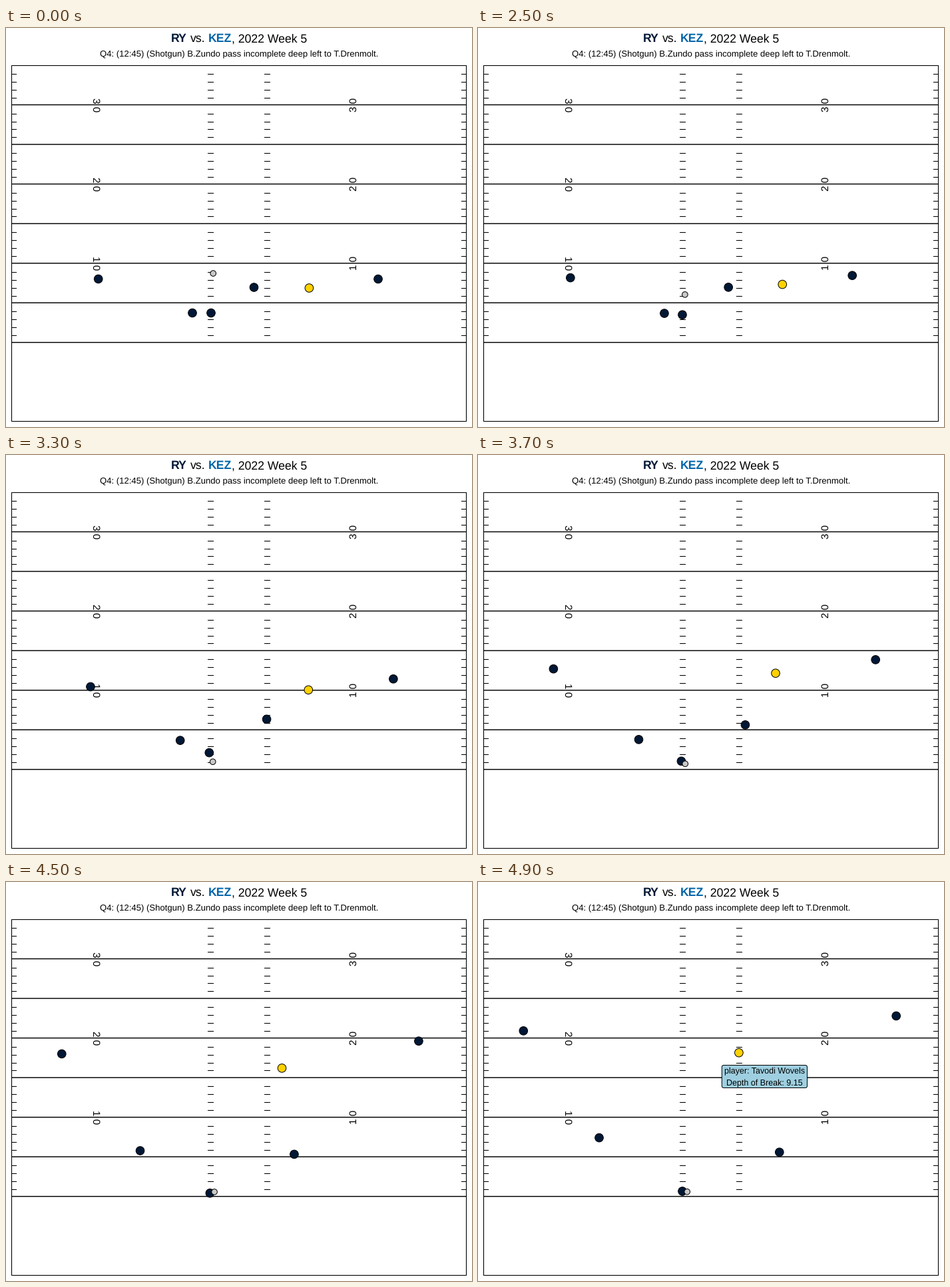
Write a matplotlib script that moves like this. It is 700 px wide and 600 px high and loops after 7 s.

```python
import math

import numpy as np
import matplotlib.pyplot as plt
from matplotlib.animation import FuncAnimation
from matplotlib.patches import Circle, FancyBboxPatch, Rectangle

W, H, DPI = 700, 600, 100
PT = 72 / DPI  # points per pixel

NAVY, BLUE, GOLD = "#001836", "#0065a9", "#ffd100"
GRAY, SKY = "#c8c8c8", "#9ecfe0"

LEFT, RIGHT, TOP, BOTTOM = 8.5, 691.5, 56.5, 591.5
GOAL, YARD = 472.8, 11.91

HOLD, LAST, FRAMES, STEP = 20, 29, 70, 100

plt.rcParams["font.family"] = "Liberation Sans"
plt.rcParams["text.hinting"] = "no_hinting"

fig = plt.figure(figsize=(W / DPI, H / DPI), dpi=DPI, facecolor="white")
ax = fig.add_axes([0, 0, 1, 1])
ax.set_xlim(0, W)
ax.set_ylim(H, 0)
ax.axis("off")


def text(x, y, s, px, **kw):
    kw = {"ha": "left", "va": "baseline", "color": "black", **kw}
    return ax.text(x, y, s, fontsize=px * PT, **kw)


def hline(x0, x1, y, px):
    ax.plot([x0, x1], [y, y], color="black", lw=px * PT,
            solid_capstyle="butt", snap=False, zorder=1)


def yard_y(yard):
    return GOAL - YARD * yard


def draw_titles():
    text(247.4, 21.3, "RY", 17.6, color=NAVY, weight="bold")
    text(276.6, 21.3, "vs.", 17.6)
    text(304.0, 21.3, "KEZ", 17.6, color=BLUE, weight="bold")
    text(339.2, 21.3, ", 2022 Week 5", 17.6)
    text(349.8, 43.4, "Q4: (12:45) (Shotgun) B.Zundo pass incomplete "
         "deep left to T.Drenmolt.", 13.15, ha="center")


def draw_field():
    ax.add_patch(Rectangle((LEFT, TOP), RIGHT - LEFT, BOTTOM - TOP, fill=False,
                           ec="black", lw=1.1 * PT, snap=False, zorder=1))
    for yard in range(35):
        y = yard_y(yard)
        if yard % 5 == 0:
            hline(LEFT, RIGHT, y, 1.45)
            continue
        y = math.floor(y + 1.75) + 0.5  # ticks sit on whole pixel rows
        for x0, x1 in ((LEFT, 16), (303, 312), (388, 397), (684, RIGHT)):
            hline(x0, x1, y, 1.1)
    for yard in (10, 20, 30):
        for x, angle in ((130.3, 270), (526.8, 90)):
            text(x, yard_y(yard), f"{yard // 10} 0", 15.2, ha="center",
                 rotation=angle, rotation_mode="anchor", zorder=2)


def glide(points):
    """Smooth run from rest through the points, sampled at every step."""
    k, p = np.array(BEATS, float), np.array(points, float)
    slope = np.gradient(p, k, axis=0)
    slope[0] = 0
    t = np.clip(np.arange(LAST + 1), k[0], k[-1])
    i = np.clip(np.searchsorted(k, t, side="right") - 1, 0, len(k) - 2)
    h = (k[i + 1] - k[i])[:, None]
    u = (t - k[i])[:, None] / h
    s = u * u * (3 - 2 * u)
    return (p[i] + s * (p[i + 1] - p[i])
            + h * u * (1 - u) * ((1 - u) * slope[i] - u * slope[i + 1]))


def runner(color, radius, *points):
    path = glide(points)
    dot = Circle(path[0], radius, fc=color, ec="black", lw=PT, zorder=4)
    ax.add_patch(dot)
    return dot, path


def make_label():
    box = FancyBboxPatch((366.3, 275.5), 128.2, 34,
                         boxstyle="round,pad=0,rounding_size=2.8",
                         fc=SKY, ec="black", lw=PT, zorder=6)
    ax.add_patch(box)
    style = {"ha": "center", "zorder": 7}
    return [box,
            text(430.4, 288.3, "player: Tavodi Wovels", 12.5, **style),
            text(430.4, 306.1, "Depth of Break: 9.15", 12.5, **style)]


draw_titles()
draw_field()

# Steps of the snap, the catch, the break and the end
BEATS = (1, 9, 21, 29)
BIG, SMALL = 6.3, 4.3
runners = [
    runner(NAVY, BIG, (138.7, 377.4), (136.1, 367.2), (98.7, 291.4), (68.3, 223.8)),
    runner(NAVY, BIG, (280, 428.5), (275.5, 429.2), (220.8, 420.5), (182, 384.6)),
    runner(NAVY, BIG, (308, 428.5), (305.6, 437.3), (305.8, 468.3), (307, 465)),
    runner(NAVY, BIG, (372.5, 390), (383.6, 391.2), (414.8, 410.8), (452.8, 406.3)),
    runner(NAVY, BIG, (559, 377.5), (569.8, 358.4), (610.6, 275.2), (628.2, 201.4)),
    runner(GOLD, BIG, (455.4, 391), (457.9, 372.7), (434.4, 303.1), (391.9, 256.7)),
    runner(GRAY, SMALL, (311.2, 369), (310.5, 445.5), (312, 465), (314.2, 465.8)),
]
label = make_label()


def update(frame):
    step = min(max(frame - HOLD, 0), LAST)
    for dot, path in runners:
        dot.center = path[step]
    for part in label:
        part.set_visible(step == LAST)
    return [dot for dot, _ in runners] + label


anim = FuncAnimation(fig, update, frames=FRAMES, interval=STEP,
                     init_func=lambda: update(0), repeat=True, repeat_delay=0)
plt.show()
```
